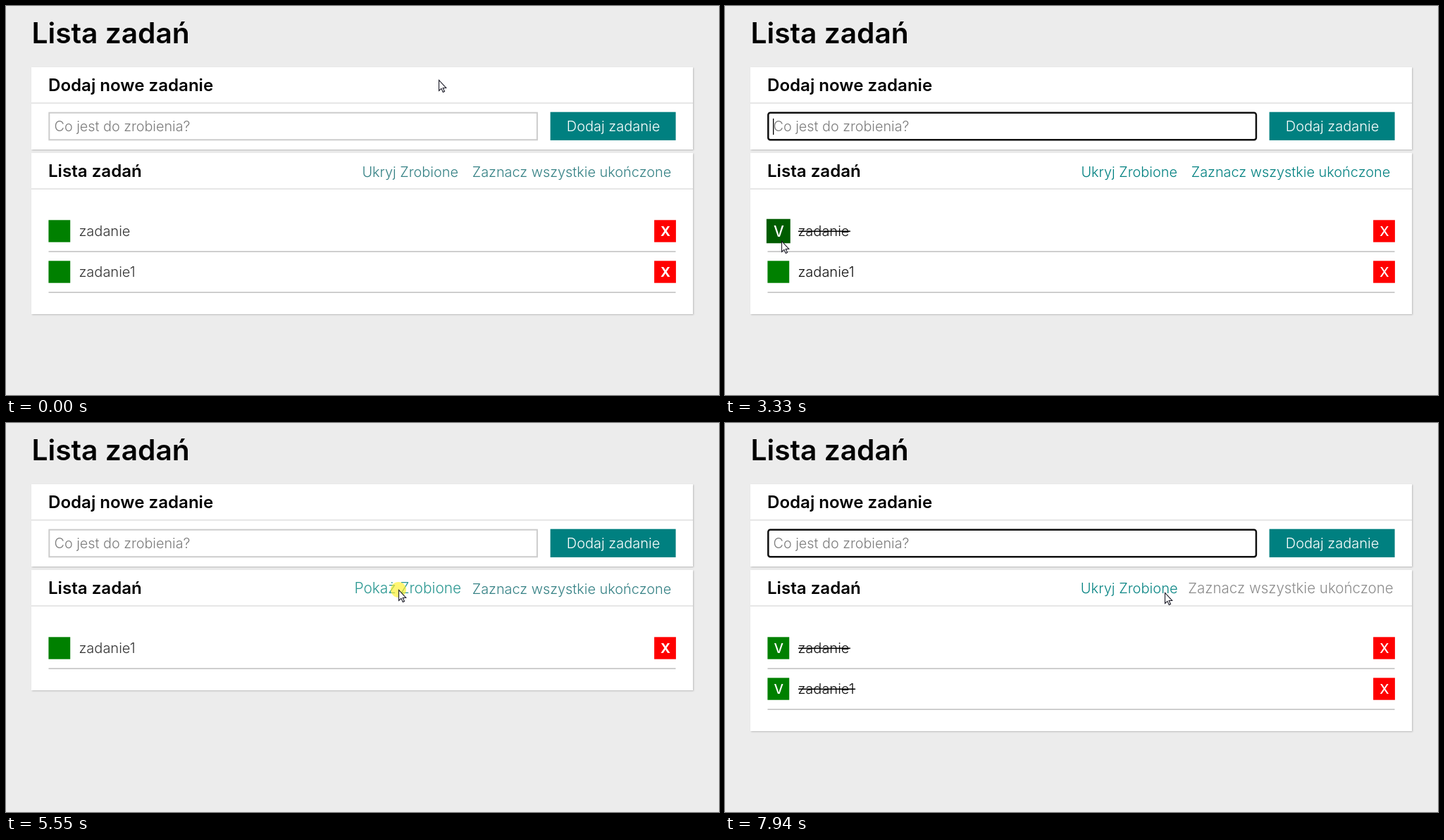
An HTML page with a canvas that plays this animation: 1012x553 px, repeating every 8 s.

```html
<!DOCTYPE html>
<html lang="pl">
<head>
<meta charset="utf-8">
<title>Lista zadań</title>
<style>
html, body { margin: 0; width: 100%; height: 100%; overflow: hidden; background: #ececec; }
canvas { display: block; }
</style>
</head>
<body>
<canvas id="stage" width="1012" height="553"></canvas>
<script>
const ctx = document.getElementById('stage').getContext('2d');
const LOOP = 8000;
const FONT = 'Inter, "Open Sans", sans-serif';
const ARROW = new Path2D('M0 0V15L3.4 11.8 5.8 17 8 16 5.7 11H10.2Z');

const CLICKS = { check: 2810, hide: 4390, show: 5660, all: 7110 };
const HOLD = 180;           // how long the button stays down before a click
const BLINK = 530;

// Cursor strokes between resting places
const START = { x: 614, y: 105 };
const MOVES = [
  { from: 540, to: 820, x: 570, y: 241 },
  { from: 1780, to: 2480, x: 78, y: 325 },
  { from: 2620, to: 3330, x: 80, y: 334 },
  { from: 3450, to: 4150, x: 553, y: 240 },
  { from: 5060, to: 5410, x: 557, y: 237 },
  { from: 5700, to: 6700, x: 708, y: 237 },
  { from: 7450, to: 7940, x: 624, y: 241 }
];

const clamp = v => Math.min(1, Math.max(0, v));
const mix = (a, b, p) => a + (b - a) * p;
const smooth = p => p * p * (3 - 2 * p);
const rgb = (a, b, p) => `rgb(${a.map((v, i) => Math.round(mix(v, b[i], p)))})`;

// CSS "ease": cubic-bezier(.25, .1, .25, 1)
function ease(x) {
  x = clamp(x);
  let lo = 0, hi = 1;
  for (let i = 0; i < 18; i++) {
    const s = (lo + hi) / 2;
    if (.75 * s * (1 - s) + s ** 3 < x) lo = s; else hi = s;
  }
  return .3 * lo * (1 - lo) ** 2 + 3 * lo * lo * (1 - lo) + lo ** 3;
}

// One-second hover transition, entered at a and left at b
function hover(t, a, b = LOOP) {
  const grown = ease((Math.min(t, b) - a) / 1000);
  return grown * (1 - ease((t - b) / 1000));
}

function cursorAt(t) {
  return MOVES.reduce((pos, m) => {
    const p = smooth(clamp((t - m.from) / (m.to - m.from)));
    return { x: mix(pos.x, m.x, p), y: mix(pos.y, m.y, p) };
  }, START);
}

function rect(x, y, w, h, color) {
  ctx.fillStyle = color;
  ctx.fillRect(x, y, w, h);
}

function text(str, x, y, size, weight, color, align = 'left') {
  ctx.font = `${weight} ${size}px ${FONT}`;
  ctx.fillStyle = color;
  ctx.textAlign = align;
  ctx.fillText(str, x, y);
}

function card(y, h, title) {
  ctx.save();
  ctx.shadowColor = '#bbb';
  ctx.shadowBlur = 2;
  ctx.shadowOffsetX = ctx.shadowOffsetY = 1;
  rect(36, y, 939, h, '#fff');
  ctx.restore();
  rect(36, y + 50.5, 939, 1, '#d0d0d0');
  text(title, 60, y + 33.5, 24.1, 580, '#000');
}

function input(focused, caret) {
  ctx.beginPath();
  ctx.roundRect(61.3, 151.7, 692.6, 38.6, focused ? 3 : 0);
  ctx.lineWidth = focused ? 2.5 : 2;
  ctx.strokeStyle = focused ? '#101010' : '#ccc';
  ctx.stroke();
  text('Co jest do zrobienia?', 68.5, 178, 19.8, 300, '#7c7c7c');
  if (caret) rect(68, 160, 1.3, 23, '#000');
}

function link(str, cx, p, color) {
  ctx.save();
  ctx.translate(cx, 236 - p);
  ctx.scale(1 + .05 * p, 1 + .05 * p);
  text(str, 0, 6.5, 19.9, 300, color, 'center');
  ctx.restore();
}

function cell(x, y, scale, color, mark, weight) {
  ctx.save();
  ctx.translate(x, y);
  ctx.scale(scale, scale);
  rect(-15.4, -15.7, 30.8, 31.4, color);
  text(mark, .5, 7, 19, weight, '#fff', 'center');
  ctx.restore();
}

function row(y, label, done, p, soft) {
  const weight = soft ? 500 : 700;
  cell(75.8, y, 1 + .1 * p, rgb([0, 128, 0], [0, 92, 0], p), done ? 'V' : '', weight);
  cell(935.5, y, 1, '#f00', 'X', weight);
  text(label, 103.5, y + 7, 20, 300, soft ? '#111' : '#333');
  if (done) rect(104, y - .5, ctx.measureText(label).width + 1, 1.6, '#000');
  rect(60.5, y + 28.3, 890, 1.7, '#c6c6c6');
}

function pointer({ x, y }, pressed) {
  if (pressed) {
    ctx.beginPath();
    ctx.arc(x, y, 11, 0, 2 * Math.PI);
    ctx.fillStyle = 'rgba(255, 240, 40, .65)';
    ctx.fill();
  }
  ctx.save();
  ctx.translate(x + .5, y + .5);
  ctx.fillStyle = '#fff';
  ctx.fill(ARROW);
  ctx.lineWidth = 1.1;
  ctx.strokeStyle = '#1c1c28';
  ctx.stroke(ARROW);
  ctx.restore();
}

// Hover amount of the left link; every click on it redraws it from rest
function toggleHover(t) {
  if (t < 3450) return hover(t, 700, 1950);
  if (t < CLICKS.hide) return hover(t, 4050);
  if (t < CLICKS.show) return hover(t, CLICKS.hide);
  return t < 7450 ? hover(t, CLICKS.show, 6250) : hover(t, 7780);
}

function draw(t) {
  const times = Object.values(CLICKS);
  const last = Math.max(...times.filter(c => c <= t));
  const pressed = times.some(c => t >= c - HOLD && t < c);
  const active = last > 0 && !pressed;
  const hidden = t >= CLICKS.hide && t < CLICKS.show;
  const allDone = t >= CLICKS.all;

  rect(0, 0, 1012, 553, '#ececec');
  text('Lista zadań', 36.5, 53, 40.7, 580, '#000');

  card(87, 117, 'Dodaj nowe zadanie');
  input(active && t > last + 60, active && (t - last) % (2 * BLINK) < BLINK);
  rect(772.6, 150.7, 178, 40.2, '#008080');
  text('Dodaj zadanie', 862, 178, 20, 300, '#fff', 'center');

  card(209, hidden ? 171 : 229, 'Lista zadań');
  const teal = active ? [0, 128, 128] : [52, 128, 132], lit = [44, 152, 146];
  const left = toggleHover(t);
  const right = allDone ? hover(t, CLICKS.all, 7740) : hover(t, 6300);
  link(hidden ? 'Pokaż Zrobione' : 'Ukryj Zrobione', hidden ? 570.3 : 573.7, left, rgb(teal, lit, left));
  link('Zaznacz wszystkie ukończone', 803, right, allDone ? '#8c8c8c' : rgb(teal, lit, right));

  if (!hidden) {
    const over = t < CLICKS.hide ? hover(t, 2420, 3500) : 0;
    row(320, 'zadanie', t >= CLICKS.check, over, active);
  }
  row(hidden ? 320 : 378, 'zadanie1', allDone, 0, active);
  pointer(cursorAt(t), pressed);
}

const begin = performance.now();
function tick() {
  draw((performance.now() - begin) % LOOP);
  requestAnimationFrame(tick);
}
tick();
</script>
</body>
</html>
```
